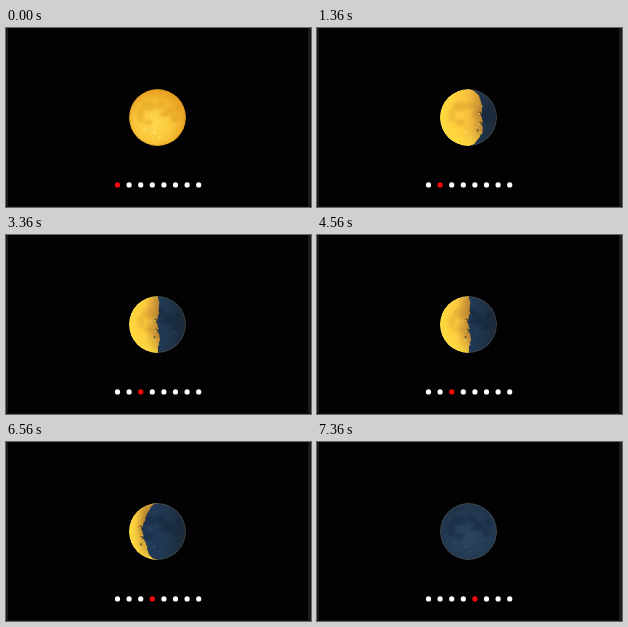
Animation, 305 px wide and 179 px high, one loop 8 s. Source, as an HTML page with a canvas:

```html
<!DOCTYPE html>
<html lang="en">
<head>
<meta charset="utf-8">
<title>Moon phases</title>
<style>
html, body { margin: 0; width: 100%; height: 100%; overflow: hidden; background: #000; }
canvas { display: block; }
</style>
</head>
<body>
<canvas id="stage" width="305" height="179"></canvas>
<script>
const ctx = document.getElementById('stage').getContext('2d');
const CX = 151.5, CY = 89.5, R = 28.5;
const LOOP = 8000, FIRST = 1360, STEP = 2000;

// Terminator position at the equator, in moon radii
const PHASES = [1, 0.5, 0.03, -0.5, -1];

// Dark plains: x, y, rx, ry relative to the centre
const MARIA = [
  [-9, -11, 7, 5], [3, -12, 5, 4], [11, -6, 5, 5], [17, 1, 4, 5],
  [-17, -2, 4, 7], [-9, 5, 5, 3], [20, -9, 2.5, 4], [6, -3, 4, 2.5]
];
// Small craters: x, y, radius
const CRATERS = [
  [-3, 15, 1.6], [17, 7, 1.1], [8, 10, 1], [-13, 12, 1.2], [-6, -3, 1], [2, 20, 1.3]
];
// Pits along the terminator: offset from it, y, radius
const PITS = [[-3, -4, 2], [-2, 6, 1.7], [-4, 13, 1.2]];

function randomFrom(seed) {
  return () => (seed = (seed * 16807) % 2147483647) / 2147483647;
}

function oval(x, y, rx, ry, fill) {
  ctx.fillStyle = fill;
  ctx.beginPath();
  ctx.ellipse(x, y, rx, ry, 0, 0, 7);
  ctx.fill();
}

function blend(gradient, ...colors) {
  colors.forEach((c, i) => gradient.addColorStop(i / (colors.length - 1), c));
  return gradient;
}

const radial = (x, y, r, ...colors) =>
  blend(ctx.createRadialGradient(x, y, 0, x, y, r), ...colors);
const across = (x1, x2, ...colors) =>
  blend(ctx.createLinearGradient(x1, 0, x2, 0), ...colors);

function surface(base, plain, light) {
  oval(0, 0, R, R, base);
  ctx.filter = 'blur(1.3px)';
  for (const [x, y, rx, ry] of MARIA) oval(x, y, rx, ry, plain);
  ctx.filter = 'blur(0.5px)';
  for (const [x, y, r] of CRATERS) oval(x, y, r, r, light);
  ctx.filter = 'none';
}

function rim(color) {
  ctx.strokeStyle = color;
  ctx.beginPath();
  ctx.arc(0, 0, R - 0.5, 0, 7);
  ctx.stroke();
}

const halfWidth = y => Math.sqrt(R * R - y * y);

// Lit part: left limb closed by a wavy, ragged terminator
function litPath(k) {
  const rnd = randomFrom(71);
  ctx.beginPath();
  ctx.arc(0, 0, R, Math.PI / 2, Math.PI * 1.5);
  for (let y = -R; y <= R; y += 1.5) {
    const w = halfWidth(y);
    const wave = 1.5 * Math.cos((y + 20) * 0.18) + (rnd() - 0.5) * 2;
    ctx.lineTo(k * w + wave * w / R, y);
  }
  ctx.closePath();
}

function drawFull() {
  surface(radial(-4, 6, 35, '#ffd950', '#fbc73a', '#e59d1e'),
    'rgba(207,139,24,0.32)', 'rgba(255,232,130,0.6)');
  rim('rgba(190,125,25,0.4)');
}

function drawDark(k) {
  const base = k > -1
    ? across(-10, R, '#213b59', '#20364e', '#1c2937')
    : radial(0, 5, 34, '#2b4560', '#253d57', '#1f3348');
  surface(base, 'rgba(18,34,54,0.4)', 'rgba(65,95,122,0.3)');
  rim('rgba(105,96,68,0.45)');
}

function drawLit(k) {
  const edge = k * R;
  ctx.save();
  litPath(k);
  ctx.clip();
  surface(across(-R, edge, '#ffd13a', '#fdc93f', '#e3a53a'),
    'rgba(200,140,45,0.32)', 'rgba(255,232,130,0.5)');
  ctx.fillStyle = across(edge - 12, edge + 2, 'rgba(120,85,40,0)', 'rgba(110,75,35,0.4)');
  ctx.fillRect(-R, -R, 2 * R, 2 * R);
  // Light falls in from the lower left
  ctx.fillStyle = radial(7, -7, R + 10, 'rgba(255,215,60,0)', 'rgba(255,215,60,0)', 'rgba(255,222,65,0.85)');
  ctx.fillRect(-R, -R, 2 * R, 2 * R);
  for (const [dx, y, r] of PITS) {
    const x = k * halfWidth(y) + dx;
    oval(x, y, r, r, 'rgba(62,52,38,0.75)');
    oval(x - 0.8, y + 0.4, r * 0.6, r * 0.7, '#eab546');
  }
  ctx.restore();
}

function drawMoon(k) {
  ctx.save();
  ctx.translate(CX, CY);
  ctx.beginPath();
  ctx.arc(0, 0, R, 0, 7);
  ctx.clip();
  if (k === 1) {
    drawFull();
  } else {
    drawDark(k);
    if (k > -1) drawLit(k);
  }
  ctx.restore();
}

function drawFrame() {
  ctx.fillStyle = '#020204';
  ctx.fillRect(0, 0, 305, 179);
  ctx.fillStyle = '#1b1b1b';
  ctx.fillRect(0, 0, 2, 179);
  ctx.fillRect(302, 0, 3, 179);
  ctx.fillStyle = '#101010';
  ctx.fillRect(0, 178, 305, 1);
}

function draw(now) {
  const t = now % LOOP;
  const step = t < FIRST ? 0 : 1 + Math.floor((t - FIRST) / STEP);
  drawFrame();
  drawMoon(PHASES[step]);
  for (let i = 0; i < 8; i++) {
    oval(111.5 + i * 11.6, 156.9, 2.6, 2.6, i === step ? '#f80808' : '#fff');
  }
}

const start = performance.now();
function tick() {
  draw(performance.now() - start);
  requestAnimationFrame(tick);
}
tick();
</script>
</body>
</html>
```
